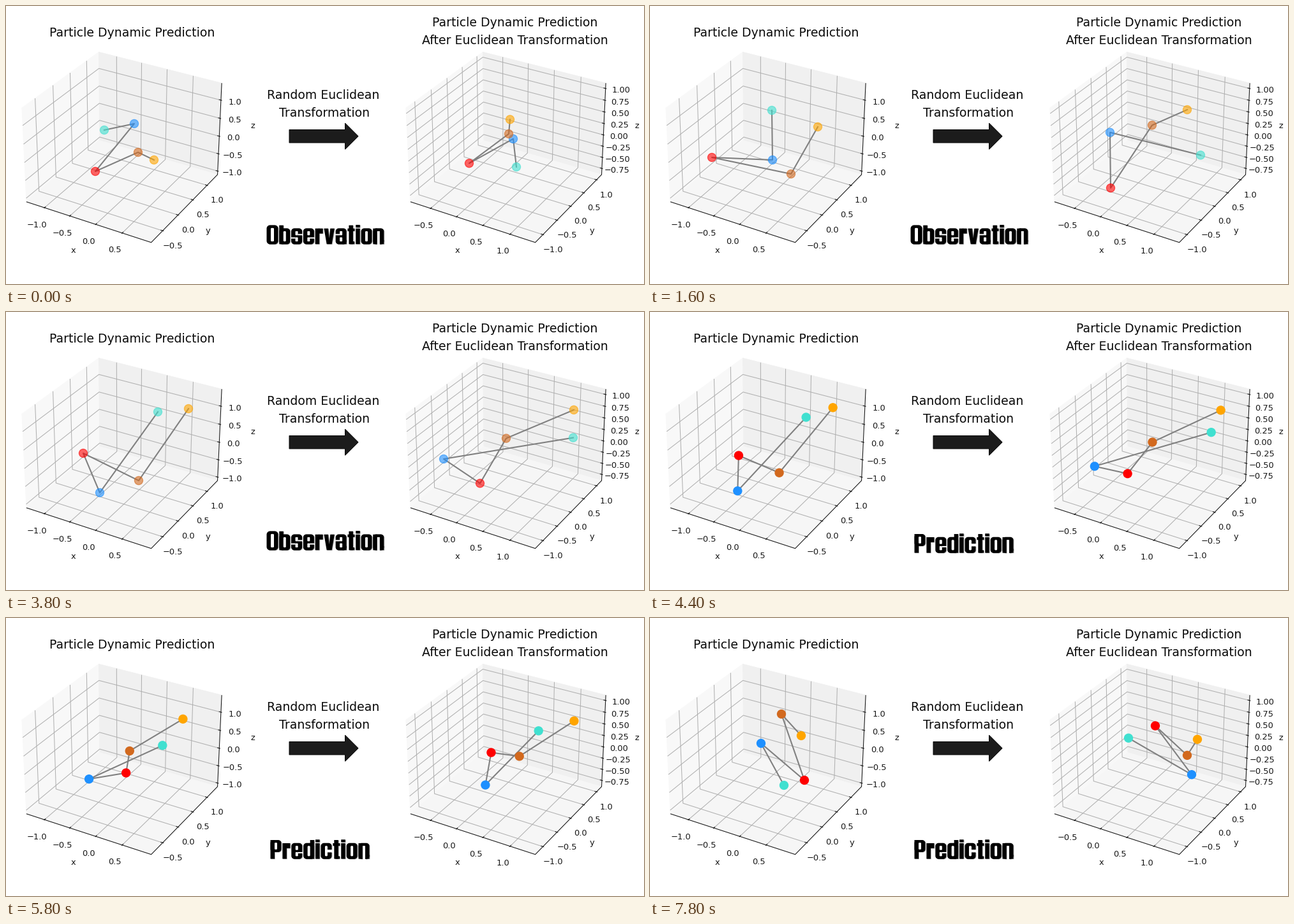
These frames come from a looping animation (1000x437 px, 8 s). A matplotlib script:

```python
import numpy as np
import matplotlib.pyplot as plt
from matplotlib.animation import FuncAnimation
from matplotlib.patches import Polygon

W, H, DPI = 1000, 437, 100
FRAMES, STEP = 40, 200
SWITCH = FRAMES // 2  # observation ends, prediction begins

fig = plt.figure(figsize=(W / DPI, H / DPI), dpi=DPI, facecolor="white")
ax = fig.add_axes([0, 0, 1, 1])
ax.set_xlim(0, W)
ax.set_ylim(H, 0)
ax.axis("off")

# ---- perspective boxes -------------------------------------------------
HALF = np.array([0.59525, 0.59525, 0.44643])
elev, azim = np.radians([30, -60])
RIGHT = np.array([-np.sin(azim), np.cos(azim), 0])
EYE = np.array([np.cos(elev) * np.cos(azim), np.cos(elev) * np.sin(azim), np.sin(elev)])
UP = np.cross(EYE, RIGHT)


def project(p, cx):
    """Box coordinates in -1..1 to stage pixels, eye at distance 10."""
    q = np.asarray(p, float) * HALF
    s = 188.3 / (1 - q @ EYE / 10)
    return np.stack([cx + s * (q @ RIGHT), 214.8 - s * (q @ UP)], -1)


def line3d(cx, pts, color, z):
    xy = project(pts, cx)
    ax.plot(xy[:, 0], xy[:, 1], color=color, lw=0.75, zorder=z,
            solid_capstyle="butt", solid_joinstyle="round")


def label(x, y, s):
    ax.text(x, y, s, fontsize=9.4, family="DejaVu Sans", color="#161616",
            ha="center", va="center_baseline", zorder=4)


def draw_box(cx, digits, *axes):
    """Each axis is first tick, tick step, then centre and scale of its values."""
    low, high = np.full(3, -1), np.ones(3)
    for fixed, side, shade in ((0, -1, "#f8f8f8"), (1, 1, "#f0f0f0"), (2, -1, "#f6f6f6")):
        a, b = [i for i in range(3) if i != fixed]
        pts = np.full((4, 3), float(side))
        pts[:, a], pts[:, b] = [-1, 1, 1, -1], [-1, -1, 1, 1]
        ax.add_patch(Polygon(project(pts, cx), fc=shade, ec=shade, lw=0.5, zorder=0))

    # ends of a grid line, then the axis edge, tick direction and label offset
    layout = [
        (lambda t: [(t, -1, -1), (t, 1, -1), (t, 1, 1)], (0, -1, 0), (-11.5, 25.5)),
        (lambda t: [(1, t, -1), (-1, t, -1), (-1, t, 1)], (1, 0, 0), (15.5, 22.5)),
        (lambda t: [(1, 1, t), (-1, 1, t), (-1, -1, t)], (1, 0, 0), (21 + 1.5 * digits, 1.7)),
    ]
    for (first, step, mid, scale), (grid, out, (dx, dy)) in zip(axes, layout):
        for v in np.arange(first, 1.01, step):
            if abs(t := mid + scale * v) > 0.96:
                continue
            pts = grid(t)
            line3d(cx, pts, "#b0b0b0", 1)
            edge, out_dir = np.array(pts[0]), np.array(out)
            line3d(cx, [edge - 0.032 * out_dir, edge + 0.016 * out_dir], "#111111", 2)
            x, y = project(edge, cx)
            places = digits if step < 0.5 else 1
            label(x + dx, y + dy, f"{v:.{places}f}".replace("-", "\u2212"))
    line3d(cx, [low, (1, -1, -1), (1, 1, -1), high], "#111111", 2)

    for name, dx, y in (("x", -79, 383.3), ("y", 132, 351.5), ("z", 202, 186.5)):
        label(cx + dx, y, name)


draw_box(184.5, 1, (-1, 0.5, 0.137, 0.834), (-0.5, 0.5, -0.233, 0.893),
         (-1, 0.5, -0.14, 0.78))
draw_box(786.5, 2, (-0.5, 0.5, -0.237, 0.85), (-1, 0.5, 0.0235, 0.81),
         (-0.75, 0.25, -0.111, 0.998))

# ---- headings and arrow ------------------------------------------------


def heading(x, base, s):
    ax.text(x, base, s, fontsize=13.6, family="DejaVu Sans", color="#0c0c0c",
            ha="center", va="baseline")


heading(198, 47.5, "Particle Dynamic Prediction")
heading(798, 32.5, "Particle Dynamic Prediction")
heading(797.5, 60.5, "After Euclidean Transformation")
heading(497.5, 146.5, "Random Euclidean")
heading(499.5, 174.5, "Transformation")

ax.arrow(444, 204.7, 108, 0, width=20.5, head_width=41, head_length=20.5,
         length_includes_head=True, fc="#1c1c1c", ec="#050505", lw=0.7)

# ---- heavy condensed lettering, built from shared parts ------------------
S, G, T = 6.5, 4, 4.2        # stem, gap and bar thickness
X, C = 24.6, 29.6            # x-height and cap height
B = 2 * S + G                # bowl width


def box(x, y, w, h, r=0.01):
    """Outline of a rounded rectangle."""
    a = np.linspace(0, 2 * np.pi, 36, endpoint=False) + np.pi / 36
    c, s = np.cos(a), np.sin(a)
    return np.column_stack([x + w / 2 + np.sign(c) * (w / 2 - r) + r * c,
                            y + h / 2 + np.sign(s) * (h / 2 - r) + r * s])


PARTS = {
    "stem": box(0, 0, S, X),
    "tall": box(0, 0, S, C),
    "right": box(B - S, 0, S, C),
    "foot": box(B - S, 0, S, S),
    "bowl": box(0, -0.3, B, X + 0.6, 5),
    "cap": box(0, -0.3, B + 1, C + 0.6, 5.5),
    "loop": box(0, C - 19, B, 19, 5),
    "arm": box(S - 1, X - 8, S, 8),
    "dot": box(0, X + 1.5, S, T),
    "post": box(2, 0, S, C),
    "cross": box(0, X - T, 11, T),
    "toe": box(T, 0, S, T),
    "vee": np.array([(0, X), (S, X), (8.2, 9), (B - S - 0.6, X), (B - 0.6, X),
                     (12.2, 0), (T, 0)]),
    "hole": box(S, T, G, X - 2 * T, 1.5),
    "tallhole": box(S, T, G + 1, C - 2 * T, 1.5),
    "eye": box(S, C - 19 + T, G, 19 - 2 * T, 1),
    "low": box(S, T, G, S, 1),
    "high": box(S, X - T - S, G, S, 1),
    "arch": box(S, -1, G, X - T + 1),
    "mouth": box(B - S - 0.2, 10.2, S + 1, T),
    "r-up": box(B - S - 0.2, X - T - S, S + 1, 2),
    "r-down": box(B - S - 0.2, T + S - 2, S + 1, 2),
    "l-up": box(-0.5, X - T - S, S + 0.7, 2),
    "l-down": box(-0.5, T + S - 2, S + 0.7, 2),
}
# solid parts, then the parts cut out of them
GLYPHS = {
    "O": ("cap", "tallhole"), "P": ("tall loop", "eye"), "b": ("tall bowl", "hole"),
    "d": ("right bowl", "hole"), "o": ("bowl", "hole"), "c": ("bowl", "hole mouth"),
    "e": ("bowl", "low high r-down"), "s": ("bowl", "low high r-up l-down"),
    "a": ("bowl foot", "low high l-up"), "n": ("stem bowl foot", "arch"),
    "r": ("stem arm", ""), "t": ("post cross toe", ""), "i": ("stem dot", ""),
    "v": ("vee", ""),
}


def lettering(word, left, base, gap):
    patches = []
    for shift, ink, z in ((1, "#a8a8a8", 3), (0, "#000000", 4)):
        x = left + shift
        for ch in word:
            solid, cuts = (names.split() for names in GLYPHS[ch])
            for names, color in ((solid, ink), (cuts, "white")):
                for name in names:
                    pts = PARTS[name] * (1, -1) + (x, base + shift / 2)
                    patches.append(ax.add_patch(Polygon(pts, fc=color, lw=0, zorder=z)))
            x += max(PARTS[name][:, 0].max() for name in solid) + gap
    return patches


words = [lettering("Observation", 408.5, 374.3, 1.8),
         lettering("Prediction", 414.5, 378.6, 1.9)]

# ---- particles ---------------------------------------------------------
# Few key points per particle: x and y in the left box, x in the right box.
KEYS = [0, 8, 19, 33, 39]
PATHS = {
    "turquoise": [(154, 195, 800), (191, 164, 863), (238, 157, 889),
                  (236, 226, 800), (210, 263, 750)],
    "dodgerblue": [(201, 185, 795), (192, 242, 721), (147, 284, 686),
                   (139, 229, 793), (174, 197, 849)],
    "red": [(140, 260, 726), (97, 238, 722), (121, 222, 743),
            (215, 254, 769), (242, 255, 792)],
    "chocolate": [(207, 230, 788), (221, 264, 787), (208, 265, 784),
                  (194, 181, 819), (206, 151, 842)],
    "orange": [(232, 242, 790), (263, 190, 842), (286, 152, 890),
               (265, 169, 880), (237, 185, 858)],
}
DEGREE = len(KEYS) - 1
curves = np.array([np.polyfit(KEYS, path, DEGREE) for path in PATHS.values()])


def positions(n):
    """The rotation ties the fourth coordinate to the other three."""
    lx, ly, rx = np.einsum("pkc,k->cp", curves, float(n) ** np.arange(DEGREE, -1, -1))
    ry = 207.5 - 0.917 * lx - 0.015 * ly + 0.237 * rx
    return (lx, ly), (rx, ry)


def make_chain():
    line, = ax.plot([], [], color="#808080", lw=1.5, zorder=5,
                    solid_joinstyle="round")
    dots = ax.scatter(*np.zeros((2, len(PATHS))), s=88, c=list(PATHS),
                      linewidths=0.95, zorder=6)
    return line, dots


chains = [make_chain(), make_chain()]


def update(n):
    predicted = n >= SWITCH
    for (x, y), (line, dots) in zip(positions(n), chains):
        line.set_data(x, y)
        dots.set_offsets(np.column_stack([x, y]))
        dots.set_alpha(1 if predicted else 0.6)
    for word, shown in zip(words, (not predicted, predicted)):
        for patch in word:
            patch.set_visible(shown)
    return []


anim = FuncAnimation(fig, update, frames=FRAMES, interval=STEP,
                     init_func=lambda: update(0), repeat=True, repeat_delay=0)
plt.show()
```
